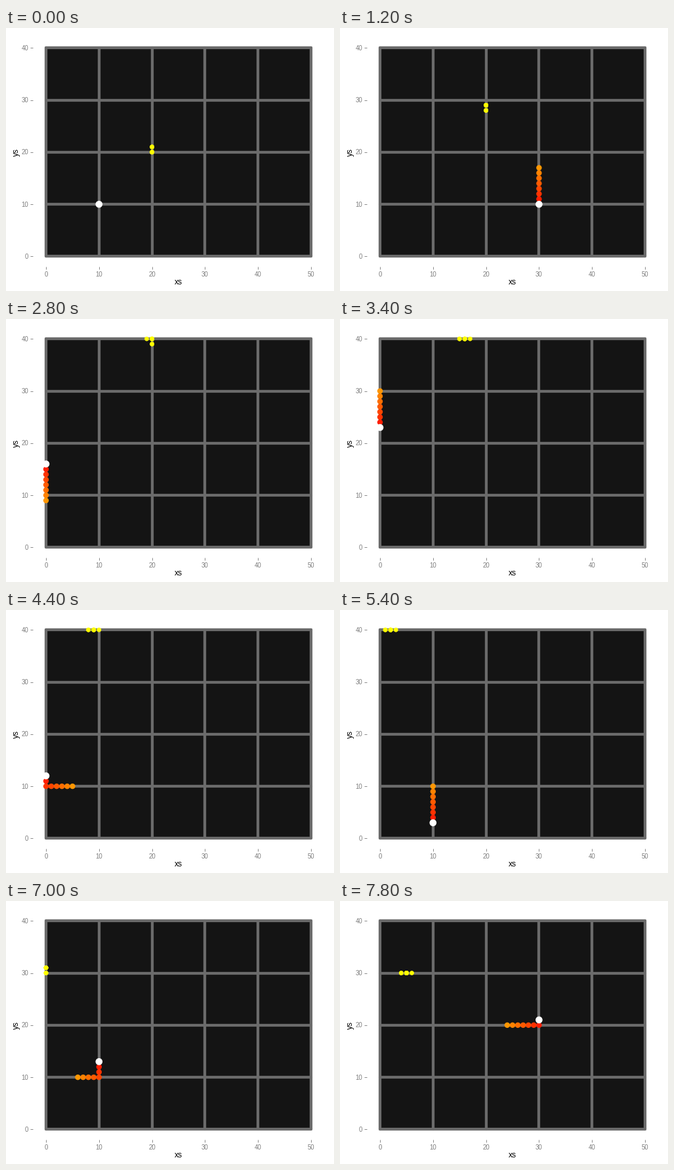
A matplotlib script that plays this animation: 500x400 px, repeating every 8000 ms.

```python
import numpy as np
import matplotlib.pyplot as plt
from matplotlib.animation import FuncAnimation

W, H, DPI = 500, 400, 100
PX = 72 / DPI  # points per pixel
FRAMES, INTERVAL = 40, 200
STEP = 7       # simulation ticks per picture
BLOCK = 10     # street length in grid units
START = 9      # tick at which the fast runner sets off

# Street corners, in blocks, passed by each runner
FAST = BLOCK * np.array([
    (1, 1), (1, 2), (2, 2), (3, 2), (3, 1), (3, 0), (2, 0), (1, 0), (0, 0),
    (0, 1), (0, 2), (0, 3), (0, 2), (1, 2), (1, 1), (0, 1), (0, 2), (1, 2),
    (1, 1), (1, 0), (2, 0), (1, 0), (0, 0), (0, 1), (1, 1), (1, 2), (2, 2),
    (3, 2), (3, 3)])
SLOW = BLOCK * np.array([
    (2, 2), (2, 3), (2, 4), (1, 4), (0, 4), (0, 3), (1, 3)])


def sx(x):
    return 61 + 8.08 * np.asarray(x)


def sy(y):
    return 347.4 - 7.93 * np.asarray(y)


def along(corners, dist):
    """Stage positions after walking the given distances."""
    marks = BLOCK * np.arange(len(corners))
    x = np.interp(dist, marks, corners[:, 0])
    y = np.interp(dist, marks, corners[:, 1])
    return np.column_stack([sx(x), sy(y)])


def area(radius):
    return (2 * radius * PX) ** 2


fig = plt.figure(figsize=(W / DPI, H / DPI), dpi=DPI, facecolor="white")
ax = fig.add_axes([0, 0, 1, 1])
ax.set_xlim(0, W)
ax.set_ylim(H, 0)
ax.axis("off")
plt.rcParams["font.family"] = "Liberation Sans"

left, right, top, bottom = sx(0), sx(50), sy(40), sy(0)
ax.fill([left, right, right, left], [top, top, bottom, bottom],
        color="#141414", lw=0)

street = dict(color="#6b6b6b", lw=4.3 * PX, solid_capstyle="round", zorder=2)
tick = dict(color="#7f7f7f", lw=0.9 * PX, solid_capstyle="butt")
label = dict(color="#7f7f7f", size=9.6 * PX, va="baseline")

for v in range(0, 51, BLOCK):
    x = sx(v)
    ax.plot([x, x], [top, bottom], **street)
    ax.plot([x, x], [363, 367.3], **tick)
    ax.text(x, 378.3, str(v), ha="center", **label)
for v in range(0, 41, BLOCK):
    y = sy(v)
    ax.plot([left, right], [y, y], **street)
    ax.plot([36.7, 41], [y, y], **tick)
    ax.text(34, y + 3.5, str(v), ha="right", **label)

title = dict(color="black", size=12 * PX, ha="center", va="baseline")
ax.text(263, 390, "xs", **title)
ax.text(19, 188.8, "ys", rotation=90, rotation_mode="anchor", **title)

# Oldest positions first, the white head last
ages = np.arange(STEP, -1, -1)
tail = [(1, (10 + 20 * a) / 255, 0) for a in ages[:-1]]
colors = [(1, 1, 0)] * len(ages) + tail + [(1, 1, 1)]
sizes = [area(3.4)] * len(ages) + [area(4.2)] * STEP + [area(5.3)]
dots = ax.scatter(np.zeros(16), np.zeros(16), s=sizes, c=colors,
                  linewidths=0, zorder=3)


def draw(i):
    ticks = STEP * (i + 1) - ages
    slow = along(SLOW, ticks // 5)
    fast = along(FAST, np.maximum(ticks - START, 0))
    dots.set_offsets(np.vstack([slow, fast]))
    return dots,


anim = FuncAnimation(fig, draw, frames=FRAMES, interval=INTERVAL,
                     repeat=True, repeat_delay=0)
plt.show()
```
